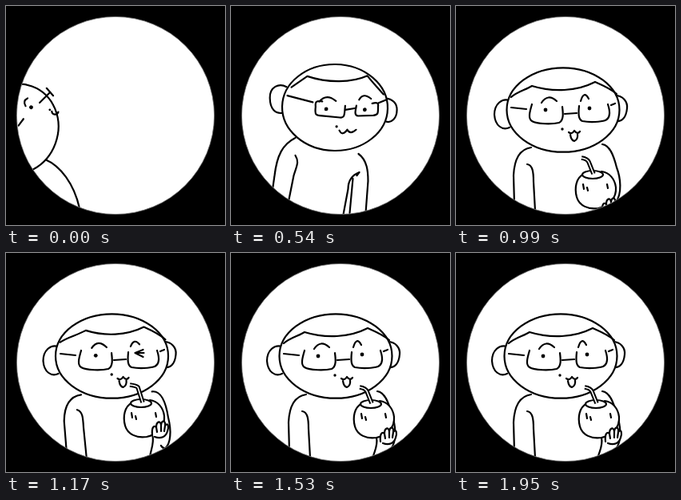
An HTML page that plays this animation: 274 by 274 pixels, repeating every 2040 ms.

```html
<!DOCTYPE html>
<html lang="en">
<head>
<meta charset="utf-8">
<title>Coconut break</title>
<style>
  html, body { margin: 0; width: 100%; height: 100%; overflow: hidden; background: #000; }
  svg { display: block; width: 100vw; height: 100vh; }
  #scene { fill: none; stroke: #000; stroke-width: 2.2; stroke-linecap: round; stroke-linejoin: round; }
  .w { fill: #fff; }
  .dot { fill: #000; stroke: none; }
</style>
</head>
<body>
<svg viewBox="0 0 274 274">
  <defs><clipPath id="hole"><circle cx="137" cy="137" r="123.5"/></clipPath></defs>
  <rect width="274" height="274"/>
  <circle cx="137" cy="137" r="123.5" fill="#fff"/>
  <g clip-path="url(#hole)"><g id="scene"></g></g>
  <circle cx="137" cy="137" r="123.6" fill="none" stroke="#777" stroke-width="0.8"/>
</svg>
<script>
const scene = document.getElementById('scene');
const LOOP = 2040, STEP = 90, SHORT_END = 1680;

const path = (d, cls = '') => `<path class="${cls}" d="${d}"/>`;
const dot = (x, y, r = 2.4) => `<circle class="dot" cx="${x}" cy="${y}" r="${r}"/>`;
const oval = (x, y, rx, ry, rot = 0) =>
  `<ellipse class="w" cx="${x}" cy="${y}" rx="${rx}" ry="${ry}" transform="rotate(${rot} ${x} ${y})"/>`;
const move = (x, y, inner, rot = 0, cx = 0, cy = 0) =>
  `<g transform="translate(${x} ${y}) rotate(${rot} ${cx} ${cy})">${inner}</g>`;

// Blend two paths that share the same commands.
function mix(a, b, k) {
  const to = b.match(/-?[\d.]+/g);
  let i = 0;
  return a.replace(/-?[\d.]+/g, n => (+n + (to[i++] - n) * k).toFixed(2));
}

// Side view: head centre, rotation, and how far the walk-in has got.
function side([x, y, rot, k]) {
  const body =
    path(mix('M49 192C68 200 85 222 92 253L93 264', 'M125 174C134 183 137 197 137 220L137 264', k)) +
    path(mix('M-40 200C-55 205 -60 220 -58 236C-58 250 -56 262 -54 270', 'M74 167C58 173 53 186 54 205C54 222 55 232 57 241', k)) +
    path(mix('M-30 220C-32 235 -28 250 -24 266', 'M73 192C71 210 76 228 78 243', k)) +
    path(mix('M-6 222C-12 228 -10 234 -10 240L-4 280', 'M101 195C96 201 97 204 97 212L103 258', k));
  const ear = path('M92 142C84 147 76 155 74 163') +
    path('M98 114C96 109 91 108 87 111C80 111 76 117 77 127C77 138 80 142 92 142', 'w') +
    path('M126 123L98 114L123 83C137 91 152 97 167 96');
  const head =
    oval(112, 122, 57 + 9 * Math.min(k, 1), 52) + (k > 0 ? ear : '') +
    path(mix('M153 138L170 146M167 151L173 140', 'M153 134L180 147M178 151L183 142', k)) +
    path('M143 123Q148 117 153 122') + dot(144, 130) + dot(149, 153, 1.4) +
    path('M148 156C144 158 145 164 150 164') +
    (k > 0 ? '' : path('M117 123L127 126'));
  return body + move(x - 112, y - 122, head, rot, 112, 122);
}

// Three-quarter view with tilted head.
function turned([x, y, rot]) {
  const body =
    path('M86 168C70 176 63 190 60 215L57 236') +
    path('M86 190C91 198 88 202 84 215L77 250') +
    path('M165 188C176 196 177 210 177 222L174 262') +
    path('M163 215L166 211C156 215 152 222 152 232L146 264M158 219L154 262');
  const head =
    path('M83 102C74 96 62 100 61 114C60 128 66 135 76 134', 'w') +
    path('M204 127C215 128 219 136 218 143C217 153 210 159 203 156', 'w') +
    oval(141, 133, 66, 54, 6) +
    path('M89 103L110 91C135 102 165 104 185 97C190 105 196 112 203 122') +
    path('M83 113L114 124M154 137L167 136M196 132L206 129') +
    path('M126 124C118 122 117 124 117 130C115 140 116 141 124 142L146 146C152 147 152 144 154 132') +
    path('M168 133C166 140 164 145 169 146L188 147C195 147 194 144 195 136C196 132 194 131 188 132') +
    path('M122 124Q132 114 143 125M172 126Q178 117 187 126') +
    dot(130, 134) + dot(178, 139) + dot(141, 157, 1.6) +
    path('M144 162Q147 170 154 162Q157 169 165 163');
  return move(x / 2, y / 2, body) + move(x, y, head, rot, 141, 133);
}

const MOUTH = {
  smile: 'M138 157Q142 160 145 155Q149 160 152 156M140 160Q141 167 145 168Q150 166 149 159',
  sip: 'M137 152Q142 153 145 150M148 152Q151 154 155 151'
};
const EYE = {
  open: dot(164, 127),
  wink: path('M170 121L160 125L170 130M162 125L171 125'),
  shut: path('M164 129L175 128')
};

// Shapes that bend between holding the drink and sipping it.
const REST = {
  hair: 'M66 113C74 106 84 104 92 99C118 107 148 106 171 94C180 98 190 102 198 109',
  brows: 'M104 120Q112 108 123 118M153 118Q157 104 163 115',
  shoulder: 'M94 177C80 179 73 190 72 212L73 248',
  sleeve: 'M89 198C96 199 97 208 97 220L99 256',
  arm: 'M183 173C194 176 198 188 202 204C207 220 208 236 197 249M182 231C184 240 180 247 178 254'
};
const SIP = {
  hair: 'M67 109C80 103 96 100 110 93C128 99 152 99 171 90C180 94 190 100 198 107',
  brows: 'M109 117Q116 106 127 118M157 115Q162 110 170 113',
  shoulder: 'M94 178C80 180 73 192 74 207L81 250',
  sleeve: 'M89 193C96 197 95 203 97 215L104 256',
  arm: 'M182 174C198 168 206 190 207 215C209 235 203 244 198 243C192 241 190 234 188 226M186 224C188 233 185 241 185 250'
};
REST.arm = 'M183 173C192 174 197 186 201 202C206 215 208 235 200 245C199 247 198 248 197 249M182 231C184 240 180 247 178 254';

function front({ head, nut, hand, straw, eye, mouth, k }) {
  const bend = name => path(mix(REST[name], SIP[name], k));
  const glasses =
    path('M66 126L85 128M133 134L148 133M191 123L196 121') +
    path('M92 122C89 132 87 140 92 143C98 147 118 147 126 145C132 142 131 133 130 125') +
    path('M151 124C150 134 150 141 155 143C165 145 178 144 184 142C190 139 190 131 187 122');
  const face =
    path('M64 117C54 114 45 122 45 135C46 149 55 155 64 151', 'w') +
    path('M196 111C206 111 212 119 211 127C210 138 205 144 197 143', 'w') +
    oval(131, 129, 70.5, 52.7) + bend('hair') + bend('brows') + move(1.5 * k, 0, glasses) +
    dot(109 + 5 * k, 129 - 2 * k) + EYE[eye] + dot(130 + 2 * k, 153 - 3 * k, 1.7) + path(MOUTH[mouth]);
  const coconut =
    path('M164 188C154 193 152 206 155 217C158 228 170 233 182 231C196 228 205 218 204 205C203 195 196 186 186 185', 'w') +
    oval(175, 189, 13, 5) +
    path('M163 201L164 207M168 205L169 209M193 201L194 206');
  const tube = `<path d="${straw}" stroke-width="5.6" stroke-linecap="butt"/>` +
    `<path d="${straw}" stroke="#fff" stroke-width="1.6" stroke-linecap="butt"/>`;
  const fingers =
    path('M187 236C186 226 189 223 192 226C192 219 197 217 198 223C199 217 204 217 203 224C207 219 208 226 206 231C204 238 198 241 190 238', 'w') +
    path('M192 226L193 232M198 223L198 231M203 224L202 231');
  return bend('shoulder') + bend('sleeve') + bend('arm') +
    move(...head, face) + move(...nut, coconut) + tube + move(...hand, fingers);
}

const open = { head: [0, 0], nut: [0, 0], hand: [0, 0], k: 0,
  straw: 'M161 168Q168 169 170 173L176 188', eye: 'open', mouth: 'smile' };
const wink = { head: [1.5, 0], nut: [-6, -1], hand: [-4, -8], k: 0.35,
  straw: 'M155 165Q163 166 165 168L171 187', eye: 'wink', mouth: 'smile' };
const sip = { head: [0, 2], nut: [-11, -7], hand: [-8, -17], k: 1,
  straw: 'M146 153Q152 157 155 162L162 182', eye: 'shut', mouth: 'sip' };
const blend = (a, b, u, extra) => {
  const pair = key => a[key].map((v, i) => v + (b[key][i] - v) * u);
  return { ...a, head: pair('head'), nut: pair('nut'), hand: pair('hand'),
    k: a.k + (b.k - a.k) * u, straw: mix(a.straw, b.straw, u), ...extra };
};
const raise = blend(wink, sip, 0.55, { eye: 'shut' });
const lower = blend(open, sip, 0.5);
const bring = { ...open, head: [3, 1], nut: [-4, 22], hand: [-4, 22], straw: 'M157 190Q164 191 166 195L172 210' };

const show = (view, ...poses) => poses.map(p => view(p));
const steps = [
  ...show(side, [13, 154, -70, 0], [53, 141, -48, 0.4], [102, 120, -22, 0.85],
    [134, 120, -5, 1.12], [112, 122, 0, 1], [117, 121, 3, 1]),
  ...show(turned, [-11, -6, -5], [3, -1, 3], [5, 1, 3], [0, 0, 0], [-4, -2, -3]),
  ...show(front, bring, open, wink, raise, sip, lower, open, wink, raise, sip, lower, open)
];

let start, shown = -1;
function tick(now) {
  start ??= now;
  const t = (now - start) % LOOP;
  // One step is shorter than the rest, ending at SHORT_END.
  const i = t < SHORT_END ? Math.floor(t / STEP) : 19 + Math.floor((t - SHORT_END) / STEP);
  if (i !== shown) scene.innerHTML = steps[shown = i];
  requestAnimationFrame(tick);
}
scene.innerHTML = steps[0];
requestAnimationFrame(tick);
</script>
</body>
</html>
```
